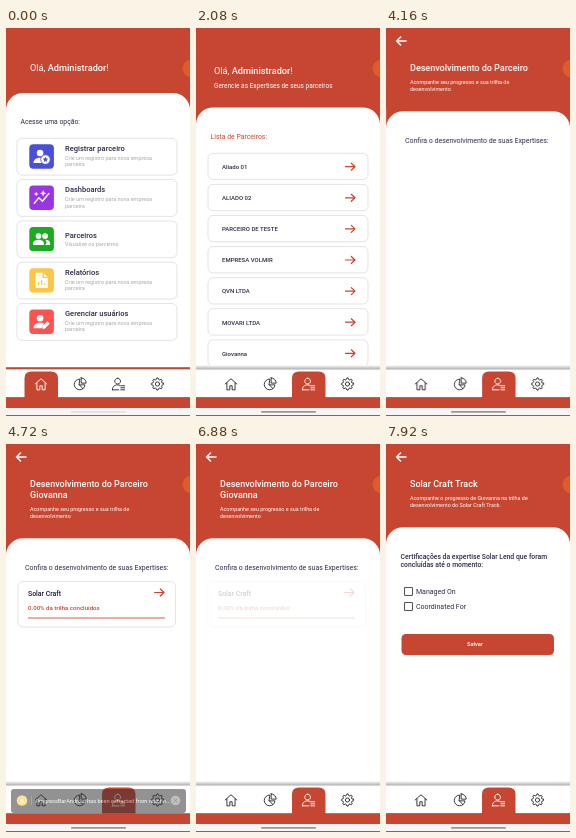
An HTML page that plays this animation: 184 by 388 pixels, repeating every 8 s.

```html
<!DOCTYPE html>
<html lang="pt-BR">
<head>
<meta charset="utf-8">
<title>Parceiros</title>
<style>
  html, body { margin: 0; width: 100%; height: 100%; overflow: hidden; background: #f2f2f2; }
  svg { display: block; width: 184px; height: 388px; overflow: hidden; }
  text { font-family: Roboto, "Noto Sans", sans-serif; white-space: pre; }
</style>
</head>
<body>
<svg id="stage" viewBox="0 0 184 388" xmlns="http://www.w3.org/2000/svg"></svg>
<script>
const LOOP = 8000;
const RED = '#c74632', NAVY = '#2b2a48', GREY = '#a9a9ad', INK = '#2c2c30';
const PERSON = 'Giovanna', COURSE = 'Solar Craft', SKILL = 'Solar Lend';

// Drawing helpers
const rect = (x, y, w, h, fill, r = 0, more = '') =>
  `<rect x="${x}" y="${y}" width="${w}" height="${h}" rx="${r}" fill="${fill}" ${more}/>`;
const text = (x, y, size, fill, str, weight = 400, more = '') =>
  `<text x="${x}" y="${y}" font-size="${size}" fill="${fill}" font-weight="${weight}" ${more}>${str}</text>`;
const group = (id, body) => `<g id="${id}">${body}</g>`;
const icon = (cx, cy, size, body, attrs) =>
  `<g transform="translate(${cx - size / 2} ${cy - size / 2}) scale(${size / 24})" ${attrs}>${body}</g>`;
const line = (color, width) =>
  `fill="none" stroke="${color}" stroke-width="${width}" stroke-linecap="round" stroke-linejoin="round"`;
const path = (d, attrs = '') => `<path d="${d}" ${attrs}/>`;
const box = (x, y, w, h) => rect(x, y, w, h, '#fff', 5, 'stroke="#dcdce2" stroke-width=".8"');
const arrow = (x, y) => path(`M${x} ${y}h9.5m-3.7 -3.5l3.7 3.5l-3.7 3.5`, line(RED, 1.2));

// Closed ring of points; radius(i) gives the distance from (cx, cy)
function ring(cx, cy, count, radius, turn = 0) {
  const points = [];
  for (let i = 0; i < count; i++) {
    const a = (i + turn) * 2 * Math.PI / count, r = radius(i);
    points.push(`${(cx + r * Math.cos(a)).toFixed(1)} ${(cy + r * Math.sin(a)).toFixed(1)}`);
  }
  return `M${points.join('L')}Z`;
}

const tabIcons = [
  path('M2 12L12 3l10 9M5 10v12h5v-7h4v7h5V10'),
  path('M11 3.5a9.2 9.2 0 1 0 9.5 10H11zM14 1.5v9h8.5a8.6 8.6 0 0 0-8.5-9zM11 13.5l6 6.5'),
  path('M10.5 2a5 5 0 1 0 .01 0M1.5 22c0-6 4-8.5 9-8.5c2 0 3 .4 4 1M1.5 22h11M16 15h6.5M16 18.5h6.5M16 22h6.5'),
  path(ring(12, 12, 32, i => i % 4 < 2 ? 10.5 : 7.8, -.5)) + '<circle cx="12" cy="12" r="3.6"/>'
];

// Screen parts
function tabBar(active, edge) {
  const cx = [35, 74, 112.5, 151.5];
  return rect(0, 337, 184, 5, edge)
    + rect(0, 341.5, 184, 28, '#fff')
    + path(`M${cx[active] - 16.5} 370v-20q0-6.5 7-6.5h19.5q7 0 7 6.5v20z`, `fill="${RED}"`)
    + cx.map((x, i) => icon(x, 356, 14, tabIcons[i], line(i === active ? '#fff' : INK, 1.6))).join('')
    + rect(0, 369.2, 184, 11, RED);
}
const panel = top => path(`M0 362V${top + 17}a17 17 0 0 1 17-17h150a17 17 0 0 1 17 17V362z`, 'fill="#fff"');
const screen = (id, body, active, edge = 'url(#shade)') =>
  group(id, rect(0, 0, 184, 388, RED) + body + tabBar(active, edge));
const greeting = (x, y) =>
  text(x, y, 9.2, '#fff', 'Olá, <tspan font-weight="500">Administrador</tspan>!');
const back = path('M20 13h-9.5m4 -4l-4 4l4 4', line('#fff', 1.5));

// Home
const person = '<circle cx="10" cy="7.5" r="4.3"/>' + path('M1.5 20.5c0-5 4-7 8.5-7s4 .5 5 1l-3 6z');
const menu = [
  ['Registrar parceiro', '#4a4fd8', person
    + '<circle cx="17" cy="16" r="6.2" stroke="#4a4fd8"/>'
    + path(ring(17, 16, 10, i => i % 2 ? 1.8 : 3.8, -2.5), 'fill="#4a4fd8"')],
  ['Dashboards', '#9a35e4', path('M2.5 19l6-7l4.5 4.5l8.5-10', line('#fff', 1.8))
    + path('M14 2l1.2 3l3 1.2l-3 1.2l-1.2 3l-1.2-3l-3-1.2l3-1.2zM5 4l.9 2.1l2.1.9l-2.1.9l-.9 2.1l-.9-2.1l-2.1-.9l2.1-.9z')],
  ['Parceiros', '#1cab22', '<circle cx="8" cy="8" r="3.7"/><circle cx="16.5" cy="8" r="3.7"/>'
    + path('M1 19.5v-2c0-3 4-4.5 7-4.5s7 1.5 7 4.5v2zM16.5 19.5H23v-2c0-3-3-4.5-6.5-4.5c1.5 1 2 2.5 2 4z')],
  ['Relatórios', '#fdc544', path('M4 2h10l6 6v14H4z')
    + path('M14 2v6h6M8 18v-4M12 18v-7M16 18v-2', 'fill="none" stroke="#fdc544" stroke-width="1.7"')],
  ['Gerenciar usuários', '#ff5352', person + path('M13 18l6.5-6.5l3 3L16 21h-3z')]
];
const menuCard = ([title, color, art], i) => {
  const y = 110.3 + i * 41.3, single = i === 2;
  const base = y + (single ? 16.7 : 12.5);
  const lines = single ? ['Visualize os parceiros'] : ['Crie um registro para nova empresa', 'parceira'];
  return group('menu' + i,
    box(11, y, 160, 36.8)
    + rect(23.3, y + 6, 24.6, 24.4, color, 4)
    + icon(35.6, y + 18.2, 18.5, art, 'fill="#fff"')
    + text(59, base, 7.5, NAVY, title, 500)
    + lines.map((s, k) => text(59, base + 8.8 + k * 6.6, 5.5, GREY, s)).join(''));
};
const home = greeting(24, 43) + panel(65)
  + text(14.5, 96, 6.8, NAVY, 'Acesse uma opção:')
  + menu.map(menuCard).join('') + rect(0, 339.2, 184, 2.5, RED);

// Partner list
const partners = ['Aliado 01', 'ALIADO 02', 'PARCEIRO DE TESTE', 'EMPRESA VOLMIR', 'QVN LTDA', 'MOVARI LTDA', PERSON];
const list = greeting(18, 46) + text(18, 59.5, 6.5, '#fff', 'Gerencie as Expertises de seus parceiros')
  + panel(79.5) + text(14.5, 111, 6.9, RED, 'Lista de Parceiros:')
  + group('rows', partners.map((name, i) => {
      const y = 125.3 + i * 31.1;
      return group('row' + i, box(12, y, 160, 26.3) + text(26, y + 15.7, 6, NAVY, name, 500) + arrow(149.5, y + 13.4));
    }).join(''));

// Partner progress
const subtitle = (first, second) => text(24, 56, 5.4, '#fff', first) + text(24, 62.5, 5.4, '#fff', second);
const detail = back
  + text(24, 42.5, 9, '#fff', 'Desenvolvimento do Parceiro', 500)
  + group('name', text(24, 53.5, 9, '#fff', PERSON, 500))
  + group('body', subtitle('Acompanhe seu progresso e sua trilha de', 'desenvolvimento')
    + panel(83.2) + text(19, 114.5, 6.95, NAVY, 'Confira o desenvolvimento de suas Expertises:'))
  + group('loaded', group('card', box(12, 137.5, 157.5, 45.5)
    + text(22, 152, 6.9, '#1d1c2c', COURSE, 500) + arrow(148.5, 148.5)
    + text(22, 166, 6.1, RED, '0.00% da trilha concluídos', 500)
    + rect(22, 173, 137, 2, '#e6b0a8')));

// Course track
const check = (y, label) =>
  rect(18.5, y, 8, 8, '#fff', .8, 'stroke="#55555c" stroke-width="1.1"') + text(30, y + 6.7, 7, NAVY, label);
const track = back + text(24, 42.5, 9, '#fff', COURSE + ' Track', 500)
  + subtitle(`Acompanhe o progresso de ${PERSON} na trilha de`, `desenvolvimento do ${COURSE} Track.`)
  + panel(83.2)
  + text(14.5, 114.5, 6.8, NAVY, `Certificações da expertise ${SKILL} que foram`, 500)
  + text(14.5, 123, 6.8, NAVY, 'concluídas até o momento:', 500)
  + group('checks', check(143.5, 'Managed On') + check(158.5, 'Coordinated For'))
  + group('save', rect(15.5, 190, 152.5, 21, RED, 4.5)
    + text(89, 202.3, 5.8, '#fff', 'Salvar', 500, 'text-anchor="middle"'));

// Warning toast
const toast = rect(5, 345, 175, 24, '#333336', 3)
  + '<circle cx="16" cy="356.5" r="5.3" fill="#f7c53d"/>'
  + text(16, 358.7, 6, '#fff', '5', 500, 'text-anchor="middle"')
  + rect(25.3, 352, .6, 9, '#77777a')
  + text(29.5, 358.5, 5.6, '#fff', 'ProgressBarAndroid has been extracted from react-n…')
  + '<circle cx="169.5" cy="356.5" r="4.8" fill="#87878a"/>'
  + path('M167.9 354.9l3.2 3.2m0-3.2l-3.2 3.2', line('#333336', .8));

const shade = '<defs><linearGradient id="shade" x1="0" y1="0" x2="0" y2="1">'
  + '<stop offset="0" stop-color="#fff"/><stop offset="1" stop-color="#a5a19f"/></linearGradient></defs>';

document.getElementById('stage').innerHTML = shade
  + screen('home', home, 0, 'none')
  + screen('list', list, 2) + screen('detail', detail, 2) + screen('track', track, 2)
  + group('toast', toast)
  + '<circle cx="185.5" cy="40.5" r="9" fill="#e05a2b"/>'
  + rect(0, 380, 184, 8, '#f7f5f5') + group('pill', rect(65, 383, 55, 1.8, '#98969a', .9))
  + rect(0, 387.3, 184, .7, '#333');

// Motion: each key is [time, properties, easing to the next key]
function play(id, keys) {
  const last = keys[keys.length - 1];
  const frames = [...keys, [LOOP, last[1]]].map(([t, props, easing = 'linear']) =>
    ({ ...props, easing, offset: t / LOOP }));
  document.getElementById(id).animate(frames, { duration: LOOP, iterations: Infinity });
}
const fade = (id, ...keys) => play(id, keys.map(([t, opacity, easing]) => [t, { opacity }, easing]));
const show = (id, t) => fade(id, [0, 0, 'step-end'], [t, 1]);
const press = (id, down, span, up) =>
  fade(id, [0, 1], [down, 1], [down + span, .2], [up, .2], [up + 250, 1]);
const at = (x, y = 0) => ({ transform: `translate(${x}px, ${y}px)` });

// Fast-out, extra-slow-in curve, split where 40% of the way is done
const SLIDE = 18.4;
const slide = (t, from, to) => [
  [t, at(from), 'cubic-bezier(.3, 0, .8, .15)'],
  [t + 75, at(from + (to - from) * .4), 'cubic-bezier(.05, .7, .1, 1)'],
  [t + 450, at(to)]
];
function visit(id, enter, leave) {
  const keys = [];
  if (enter) {
    keys.push([0, at(SLIDE)], ...slide(enter, SLIDE, 0));
    fade(id, [0, 0], [enter + 50, 0], [enter + 133, 1]);
  } else keys.push([0, at(0)]);
  if (leave) keys.push(...slide(leave, 0, -SLIDE));
  play(id, keys);
}

const TO_LIST = 1120, TO_DETAIL = 3800, TO_TRACK = 7000;
visit('home', 0, TO_LIST);
visit('list', TO_LIST, TO_DETAIL);
visit('detail', TO_DETAIL, TO_TRACK);
visit('track', TO_TRACK, 0);

press('menu2', 930, 110, TO_LIST);
press('row6', 3620, 50, TO_DETAIL);
press('card', 6820, 50, TO_TRACK);

fade('pill', [0, .2], [80, .2], [240, 1]);
show('rows', 1750);
show('name', 4220);
play('body', [[0, at(0), 'step-end'], [4220, at(0, 11)]]);
show('loaded', 4540);
fade('toast', [0, 0], [4560, 0], [4860, 1, 'step-end'], [6300, 0]);
show('checks', 7820);
play('save', [[0, at(0, -31), 'step-end'], [7820, at(0)]]);
</script>
</body>
</html>
```
